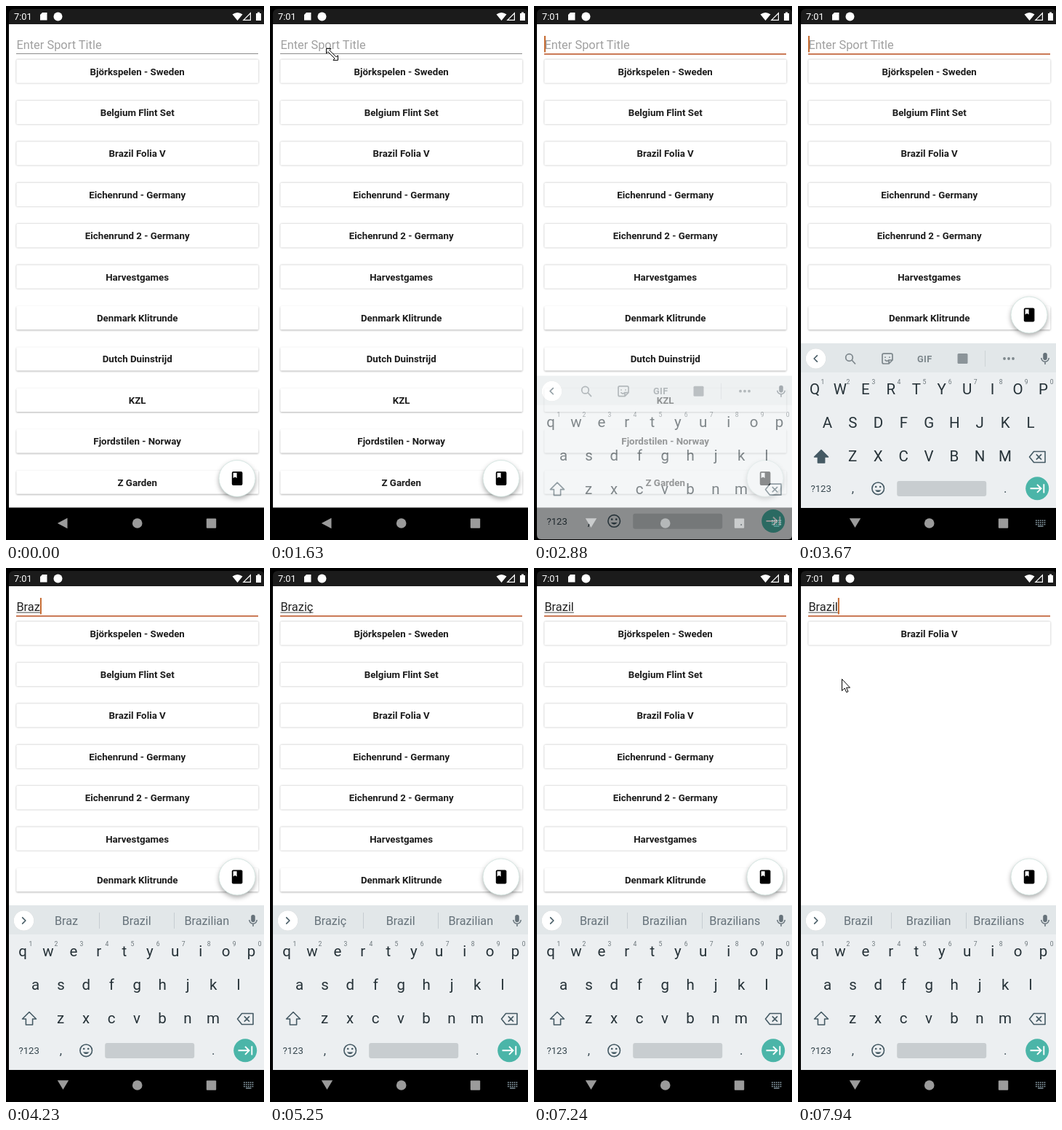
Write an HTML page that moves like this. It is 355x733 px and loops after 8 s.

```html
<!DOCTYPE html>
<html lang="en">
<head>
<meta charset="utf-8">
<title>Sport search</title>
<style>
  html, body { margin: 0; width: 100%; height: 100%; overflow: hidden; background: #000; }
  svg { display: block; width: 100vw; height: 100vh; font-family: Roboto, "Noto Sans", sans-serif; }
  .mid { text-anchor: middle; }
  .title { font-size: 13.3px; font-weight: 600; fill: #1c1c1c; }
  .field { font-size: 16.4px; }
  .key { font-size: 20.5px; fill: #263238; }
  .digit { font-size: 8.6px; fill: #6b757a; }
  .word { font-size: 16.2px; fill: #66727a; }
  .line { fill: none; stroke: #455a64; stroke-width: 1.6; stroke-linejoin: round; }
  .tool { fill: none; stroke: #7d878c; stroke-width: 1.7; }
</style>
</head>
<body>
<svg id="stage" viewBox="0 0 355 733"></svg>
<script>
const LOOP = 8000;
const PITCH = 56.4;
const TITLES = [
  'Björkspelen - Sweden', 'Belgium Flint Set', 'Brazil Folia V', 'Eichenrund - Germany',
  'Eichenrund 2 - Germany', 'Harvestgames', 'Denmark Klitrunde', 'Dutch Duinstrijd',
  'KZL', 'Fjordstilen - Norway', 'Z Garden'
];
const MATCH = 2;

// Time, field text, suggestions
const TYPING = [
  [0, '', []],
  [3720, 'B', ['B', 'Be', 'But']],
  [3900, 'Br', ['Br', 'Bring', 'Bro']],
  [4050, 'Bra', ['Bra', 'Brand', 'Brave']],
  [4210, 'Braz', ['Braz', 'Brazil', 'Brazilian']],
  [4390, 'Brazi', ['Brazi', 'Brazil', 'Brazilian']],
  [4600, 'Braziç', ['Braziç', 'Brazil', 'Brazilian']],
  [6400, 'Brazi', ['Brazi', 'Brazil', 'Brazilian']],
  [6600, 'Brazil', ['Brazil', 'Brazilian', 'Brazilians']]
];
const CARET_ON = [[2370, 3030], [3670, 5250], [5755, 6270], [6400, 7235], [7740, LOOP]];

// Pointer paths: time, x, y
const RESIZE_PATH = [
  [560, 307, 728], [950, 236, 453], [1350, 133, 191], [1400, 122, 168], [1630, 77, 58],
  [1730, 75, 49], [1910, 75, 49], [2050, 63, 31], [2190, 66, 38], [2520, 66, 38]
];
const ARROW_PATH = [[7640, -10, 222], [7800, 28, 184], [7930, 60, 152], [LOOP, 60, 152]];

const clamp = v => Math.max(0, Math.min(1, v));
const span = (t, a, b) => clamp((t - a) / (b - a));
const ease = p => (1 - Math.cos(Math.PI * p)) / 2;

const rect = (x, y, w, h, fill, rest = '') =>
  `<rect x="${x}" y="${y}" width="${w}" height="${h}" fill="${fill}" ${rest}/>`;
const circle = (x, y, r, fill, rest = '') =>
  `<circle cx="${x}" cy="${y}" r="${r}" fill="${fill}" ${rest}/>`;
const path = (d, rest) => `<path d="${d}" ${rest}/>`;
const text = (x, y, cls, s, rest = '') => `<text x="${x}" y="${y}" class="${cls}" ${rest}>${s}</text>`;

function statusBar() {
  return path('M4 25V11Q4 4 11 4H349Q355 4 355 10V25Z', 'fill="#1b1b1b"') +
    text(11, 19.3, '', '7:01', 'font-size="12.8" fill="#fff"') +
    path('M50 9H56.5V19.5H47V12Z', 'fill="#fff"') +
    circle(71.5, 14.5, 6, '#fff') +
    path('M311.5 11.6Q318.5 6.4 325.5 11.6L318.5 20Z', 'fill="#fff"') +
    path('M336.4 9.8V19.4H326.8Z', 'fill="none" stroke="#fff" stroke-width="1.2"') +
    path('M344 10H346V8.6H349V10H351V20H344Z', 'fill="#fff"');
}

function card(title, i) {
  const shadow = `style="filter:drop-shadow(0 ${(0.5 + i * 0.09).toFixed(2)}px 1px rgba(0,0,0,.3))"`;
  return `<g class="card">${rect(14.3, 73.5, 333, 32.3, '#fff', 'rx="1.5" ' + shadow)}` +
    `${text(180.7, 94.6, 'mid title', title)}</g>`;
}

function fab() {
  return circle(0, 0, 25, '#fff',
    'stroke="#cfe2de" stroke-width=".8" style="filter:drop-shadow(0 3px 3px rgba(0,0,0,.32))"') +
    rect(-7.2, -9.6, 14.6, 19, '#000', 'rx="2"') +
    path('M-5.4 -7.8H-.4V-.4L-2.9 -2L-5.4 -.4Z', 'fill="#fff"');
}

function navBar() {
  const grey = '#9b9b9b';
  let dots = '';
  for (let i = 0; i < 15; i++)
    dots += rect(327 + (i % 5) * 2.9, 705.5 + Math.floor(i / 5) * 2.7, 1.7, 1.5, '#8fa3ad');
  dots += rect(330, 713.4, 7.5, 1.3, '#8fa3ad');
  return rect(0, 688.5, 355, 45, '#000') +
    path('M84.5 702.8V717.2L70.8 710Z', `id="back" fill="${grey}"`) +
    path('M70.8 703.2H86.2L78.5 716Z', `id="hide" fill="${grey}"`) +
    circle(180.7, 710, 6.8, grey) + rect(275.8, 703.4, 13.4, 13.4, grey, 'rx="1"') +
    `<g id="switcher">${dots}</g>`;
}

function letters(chars, x, y) {
  return [...chars].map((c, i) => text((x + i * 34.95).toFixed(2), y, 'mid key', c)).join('');
}

function tools() {
  return circle(70.5, 482.5, 4.8, 'none', 'class="tool"') + path('M74 486L79 491.5', 'class="tool"') +
    path('M118 477.2H128A2 2 0 0 1 130 479.2V486L125 491H118A2 2 0 0 1 116 489V479.2A2 2 0 0 1 118 477.2Z' +
      'M130 486H125V491M119.5 485.5Q122 489 125 486M120 481.5v1.5M126 481.5v1.5', 'class="tool" stroke-width="1.3"') +
    text(174.3, 488.6, 'mid', 'GIF', 'font-size="12.8" font-weight="700" letter-spacing=".4" fill="#7d878c"') +
    rect(219.5, 477, 14, 14, '#8b9499', 'rx="1.5"') +
    rect(257, 473, 1, 22, '#cdd3d6') +
    [284, 290, 296].map(x => circle(x, 484, 1.9, '#7d878c')).join('');
}

function keyboard() {
  let out = rect(4, 463, 351, 226, '#eceff1') + rect(4, 463, 351, 40, '#e2e7e9') +
    circle(24.5, 484, 13.8, '#fff', 'style="filter:drop-shadow(0 .6px .6px rgba(0,0,0,.2))"') +
    path('M22.2 479.4L26.9 484L22.2 488.6', 'id="chevron" class="line"') +
    `<g id="tools">${tools()}</g><g id="words">` +
    rect(128, 473, 1, 22, '#c6cdd1') + rect(231, 473, 1, 22, '#c6cdd1') +
    [83, 179.7, 276.3].map(x => text(x, 490, 'mid word', '')).join('') + '</g>' +
    rect(337.2, 476, 5.6, 10, '#66727a', 'rx="2.8"') +
    path('M334.8 483A5.2 5.2 0 0 0 345.2 483M340 488.4V492', 'fill="none" stroke="#66727a" stroke-width="1.5"');

  out += letters('qwertyuiop', 23, 533) + letters('asdfghjkl', 40.5, 579) + letters('zxcvbnm', 75.2, 625);
  for (let i = 0; i < 10; i++)
    out += text((33.8 + i * 35.05).toFixed(2), 519.2, 'mid digit', (i + 1) % 10);

  out += path('M32 609.5L41.5 619H36.6V627H27.4V619H22.5Z', 'id="shift" class="line"') +
    path('M324.5 611.5H340V626.5H324.5L318.5 619ZM327.8 615.4L335 622.6M335 615.4L327.8 622.6', 'class="line"') +
    text(31.7, 667.2, 'mid', '?123', 'font-size="13.2" fill="#37474f"') +
    text(75.5, 668, 'mid', ',', 'font-size="17" fill="#37474f"') +
    circle(110.2, 662.3, 8.3, 'none', 'class="line"') +
    circle(107.2, 660, 1.3, '#455a64') + circle(113.2, 660, 1.3, '#455a64') +
    path('M105.8 664.4Q110.2 669.8 114.6 664.4Z', 'fill="#455a64"') +
    rect(136.2, 652, 123, 21, '#c8cdd0', 'rx="3"') +
    text(285.3, 668, 'mid', '.', 'font-size="17" fill="#37474f"') +
    circle(329.2, 662.3, 16, '#4bb5a8') +
    path('M319.5 662.3H334M329 656.8L334.5 662.3L329 667.8M338.3 656.2V668.4',
      'fill="none" stroke="#fff" stroke-width="1.9"');
  return out;
}

const stage = document.getElementById('stage');
stage.innerHTML =
  '<clipPath id="screen"><path d="M4 0H355V727Q355 732 350 732H10Q4 732 4 726Z"/></clipPath>' +
  rect(0, 0, 355, 733, '#000') + rect(4, 25, 351, 664, '#fff') + statusBar() +
  text(14.4, 59.3, 'field', 'Enter Sport Title', 'id="hint" fill="#a0a0a0"') +
  text(14.4, 59.3, 'field', '', 'id="typed" fill="#212121"') +
  rect(14.4, 60.6, 0, 1, '#444', 'id="compose"') +
  rect(14, 65, 333, 1, '#8c8c8c', 'id="underline"') +
  rect(14, 41, 2, 22.5, '#c5692f', 'id="caret"') +
  TITLES.map(card).join('') +
  `<g id="fab">${fab()}</g>` + navBar() +
  `<g clip-path="url(#screen)"><g id="keyboard">${keyboard()}</g></g>` +
  path('M.5 .5H7L5 2.9 14.1 12 16.5 10V16.5H10L12 14.1 2.9 5 .5 7Z',
    'id="resize" fill="#fff" stroke="#000" stroke-width="1"') +
  path('M.5 .5V16.5L4.2 13L6.7 18.6L9 17.6L6.6 12.2H11.5Z',
    'id="arrow" fill="#fff" stroke="#000" stroke-width="1"');

const el = {};
stage.querySelectorAll('[id]').forEach(n => { el[n.id] = n; });
const cards = [...stage.querySelectorAll('.card')];
const words = [...stage.querySelectorAll('.word')];
const keys = [...stage.querySelectorAll('.key')];
const keyNames = keys.map(k => k.textContent);

const set = (node, attrs) => { for (const k in attrs) node.setAttribute(k, attrs[k]); };
const show = (node, on) => set(node, { visibility: on ? 'visible' : 'hidden' });
const move = (node, x, y) => set(node, { transform: `translate(${x.toFixed(2)} ${y.toFixed(2)})` });
const write = (node, s) => { if (node.textContent !== s) node.textContent = s; };

function follow(node, points, t) {
  const next = points.findIndex(p => p[0] > t);
  show(node, next > 0);
  if (next < 1) return;
  const [a, b] = [points[next - 1], points[next]];
  const p = span(t, a[0], b[0]);
  move(node, a[1] + (b[1] - a[1]) * p, a[2] + (b[2] - a[2]) * p);
}

function drawField(t, value) {
  const focused = t >= 2370;
  write(el.typed, value);
  show(el.hint, !value);
  const width = value ? el.typed.getComputedTextLength() : 0;
  set(el.compose, { width });
  set(el.underline, { height: focused ? 2 : 1, fill: focused ? '#cb7a56' : '#8c8c8c' });
  set(el.caret, { x: 14 + width + (value ? 0.4 : 0) });
  show(el.caret, CARET_ON.some(([a, b]) => t >= a && t < b));
}

function drawList(t) {
  const cleared = t < 7240 ? 1 - span(t, 5250, 5550) : 1;
  const filtered = 1 - span(t, 7390, 7530);
  cards.forEach((node, i) => {
    const opacity = i === MATCH ? cleared : cleared * filtered;
    const lift = i === MATCH ? MATCH * ease(span(t, 7530, 7780)) : 0;
    set(node, { opacity });
    move(node, 0, (i - lift) * PITCH);
  });
}

function drawKeyboard(t, value, suggestions) {
  const p = span(t, 2680, 3025);
  show(el.keyboard, p > 0);
  set(el.keyboard, { opacity: p });
  move(el.keyboard, 0, (1 - p) * 107);
  show(el.back, p === 0);
  show(el.hide, p > 0);
  show(el.switcher, p > 0);
  move(el.fab, 318, p < 1 ? 648.5 : 424);

  const typing = value !== '';
  set(el.tools, { display: typing ? 'none' : 'inline' });
  set(el.words, { display: typing ? 'inline' : 'none' });
  set(el.chevron, { transform: typing ? '' : 'translate(49 0) scale(-1 1)' });
  words.forEach((node, i) => write(node, suggestions[i] || ''));

  const caps = t >= 3670 && t < 3820;
  keys.forEach((node, i) => write(node, caps ? keyNames[i].toUpperCase() : keyNames[i]));
  set(el.shift, { style: caps ? 'fill:#455a64' : '' });
}

function draw(t) {
  const [, value, suggestions] = TYPING.filter(s => s[0] <= t).pop();
  drawField(t, value);
  drawList(t);
  drawKeyboard(t, value, suggestions);
  follow(el.resize, RESIZE_PATH, t);
  follow(el.arrow, ARROW_PATH, t);
}

function tick() {
  draw(performance.now() % LOOP);
  requestAnimationFrame(tick);
}
tick();
</script>
</body>
</html>
```
